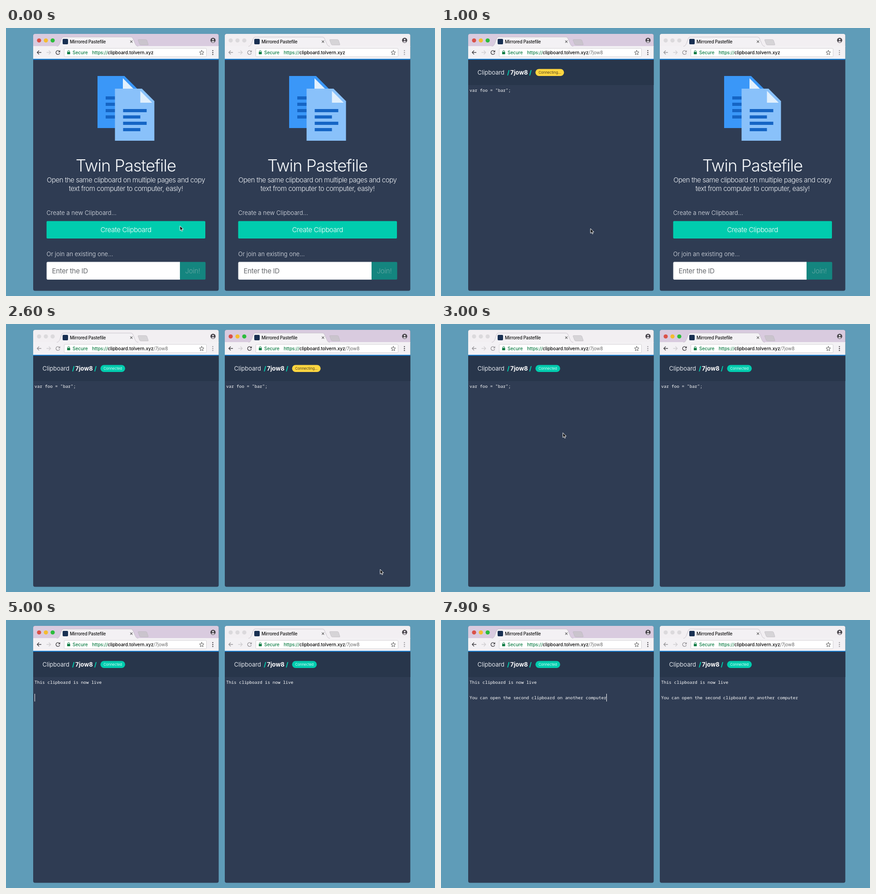
An HTML page with a canvas that plays this animation: 947x592 px, repeating every 8000 ms.

```html
<!DOCTYPE html>
<html lang="en">
<head>
<meta charset="utf-8">
<title>Shared clipboard</title>
<style>
html, body { margin: 0; width: 947px; height: 592px; overflow: hidden; background: #5f9cb8; }
canvas { display: block; }
</style>
</head>
<body>
<canvas id="stage" width="947" height="592"></canvas>
<script>
const ctx = document.getElementById('stage').getContext('2d');
const LOOP = 8000, ID = '7jow8', TEAL = '#00ccae';
const SANS = 'Inter, "Open Sans", sans-serif', MONO = '"Noto Sans Mono", monospace';
const LINE1 = 'This clipboard is now live';
const LINE2 = 'You can open the second clipboard on another computer';

const clamp = (v, lo, hi) => Math.max(lo, Math.min(hi, v));
const between = (t, a, b) => t >= a && t < b;
const typed = (t, start, step, max) => clamp(Math.floor((t - start) / step), 0, max);

function text(s, x, y, size, color, { weight = 400, spacing = 0, align = 'left', family = SANS } = {}) {
  ctx.font = `${weight} ${size}px ${family}`;
  ctx.letterSpacing = spacing + 'px';
  ctx.textAlign = align;
  ctx.fillStyle = color;
  ctx.fillText(s, x, y);
  return x + ctx.measureText(s).width;
}

function box(x, y, w, h, color, radius = 0, stroke) {
  ctx.beginPath();
  ctx.roundRect(x, y, w, h, radius);
  ctx.fillStyle = color;
  ctx.fill();
  if (stroke) { ctx.strokeStyle = stroke; ctx.lineWidth = 1; ctx.stroke(); }
}

function dot(x, y, r, color) {
  ctx.beginPath();
  ctx.arc(x, y, r, 0, 7);
  ctx.fillStyle = color;
  ctx.fill();
}

function shape(points, fill, stroke, width = 1) {
  const path = new Path2D('M' + points);
  if (fill) { ctx.fillStyle = fill; ctx.fill(path); }
  if (stroke) { ctx.strokeStyle = stroke; ctx.lineWidth = width; ctx.stroke(path); }
}

function chrome(active, path) {
  const icon = active ? '#444246' : '#99979b', bar = '#f3f1f4';
  box(60, 13, 409.5, 28, active ? '#d9cbdf' : '#f2eff2', [4, 4, 0, 0]);
  ['#da5148', '#f5bc2f', '#2cbc3c'].forEach((c, i) =>
    dot(73 + i * 15, 27.5, 4.6, active ? c : '#dbd9dc'));

  box(60, 40, 409.5, 28, bar);
  shape('112 40.5C117 40 118 36 120 31L123 23Q124 20 127 20H276Q279 20 280 23L284 32C286 37 287 40 292 40.5', bar, '#bdb6c0', .8);
  shape('293 25.5H308Q310 25.5 311 27L314 36Q314.5 37.5 313 37.5H298Q296 37.5 295 36L291.5 27Q291 25.5 293 25.5Z',
    active ? '#cac4cd' : '#d6d4d7', '#b8b2bb', .6);
  box(125, 24, 12, 12, '#193052', 2);
  text('Mirrored Pastefile', 141, 33.5, 9.7, '#111', { weight: 500, spacing: -.17 });
  shape('274.2 27.7L279.2 32.7M279.2 27.7L274.2 32.7', null, '#555', 1.1);

  dot(457, 27.3, 5.7, '#49464c');
  dot(457, 25.6, 1.9, '#e8e2ea');
  shape('453.3 30.5Q457 27 460.7 30.5Q457 33.5 453.3 30.5Z', '#e8e2ea');

  shape('78 54H69M73 49.8L68.8 54L73 58.2', null, icon, 1.4);
  shape('89.5 54H98.5M94.5 49.8L98.7 54L94.5 58.2', null, '#d0ced1', 1.4);
  ctx.beginPath();
  ctx.arc(114.5, 54.2, 4.2, .3, 5.5);
  ctx.strokeStyle = icon;
  ctx.lineWidth = 1.4;
  ctx.stroke();
  shape('119.5 49V53.5H115Z', icon);

  box(128.5, 45, 314, 18.5, '#fff', 2, '#d2d0d3');
  box(135, 53, 6.6, 5, '#0b7c43', .7);
  shape('136.3 53.5V52Q136.3 50 138.3 50Q140.3 50 140.3 52V53.5', null, '#0b7c43', 1.1);
  text('Secure', 147, 58, 10, '#0b7c43', { weight: 500 });
  let x = text('https://', 190, 58, 10, '#0b7c43', { weight: 500, spacing: -.05 });
  x = text('clipboard.tolvern.xyz', x, 58, 10, '#000', { weight: 500 });
  text(path, x, 58, 10, '#666');
  shape('432 49.2L433.4 52.7L437 53L434.2 55.4L435.1 59L432 57L428.9 59L429.8 55.4L427 53L430.6 52.7Z',
    null, '#555', 1);
  [50, 54.2, 58.4].forEach(y => dot(456.5, y, 1.2, icon));
  box(60, 68, 409.5, 2.2, '#1b82d6');
}

function sheet(x, y, body) {
  ctx.save();
  ctx.translate(x, y);
  shape('0 0H59.5L87 27.5V115H0Z', body);
  shape('56 5V31H82Z', '#e1f0fd');
  [52, 38, 52, 38].forEach((w, i) => box(18, 45 + i * 14, w, 7, '#1565c5'));
  ctx.restore();
}

function home(value, focused) {
  const light = { weight: 300, spacing: -.46, align: 'center' };
  const label = { weight: 300, spacing: .05 };
  sheet(202, 106, '#3a97f8');
  sheet(240.5, 134, '#89c1fa');
  text('Twin Pastefile', 264.5, 317, 36.5, '#f5f8fb', { ...light, spacing: -1 });
  text('Open the same clipboard on multiple pages and copy', 264.7, 341, 15, '#f1f4f8', light);
  text('text from computer to computer, easly!', 264.7, 360, 15, '#f1f4f8', light);

  text('Create a new Clipboard...', 89.5, 412.7, 13, '#e2e6ec', label);
  box(89.5, 426.5, 350.5, 38.5, TEAL, 2);
  text('Create Clipboard', 264.7, 451, 15, '#fff', { ...light, spacing: -.33 });

  text('Or join an existing one...', 89.5, 503.5, 13, '#e2e6ec', label);
  box(90, 517, 294, 38.5, '#fff', [2, 0, 0, 2], focused ? TEAL : '#dfe2e6');
  box(384, 516.7, 56.5, 39, value ? TEAL : '#14857f', [0, 2, 2, 0]);
  text('Join!', 412, 541.7, 15, value ? '#fff' : '#68aaa6', { ...light, spacing: -.2 });
  const end = value
    ? text(value, 102, 542, 15.5, '#222', { spacing: -.3 })
    : (text('Enter the ID', 101.5, 542.3, 15, '#66696d', { spacing: -.3 }), 102);
  if (focused) box(end, 528, 1, 17, '#222');
}

function board(connected, lines, caretLine) {
  box(60, 70, 409.5, 56, '#28364b');
  text('Clipboard', 80.5, 103, 13, '#e3e7ed');
  text('/', 146, 103, 13.5, TEAL, { weight: 800 });
  text(ID, 153, 103, 13, '#fff', { weight: 700, spacing: .1 });
  text('/', 194.8, 103, 13.5, TEAL, { weight: 800 });
  box(208.5, 90.5, connected ? 54.5 : 63, 15.5, connected ? TEAL : '#ffd640', 8);
  text(connected ? 'Connected' : 'Connecting...', 215.3, 101, 7.9, connected ? '#d9fff8' : '#4a4020');
  lines.forEach((s, i) => {
    const end = text(s, 63, 141 + i * 17, 9.5, '#fff', { weight: 500, family: MONO });
    if (i === caretLine) box(Math.round(end), 129 + i * 17, 1, 17, '#fff');
  });
}

function note(t) {
  if (t < 3246) return ['var foo = "bar";'];
  const lines = [LINE1.slice(0, typed(t, 3215, 31, LINE1.length))];
  if (t >= 4450) lines.push('');
  if (t >= 4650) lines.push(LINE2.slice(0, typed(t, 5102, 45, LINE2.length)));
  return lines;
}

function pane(offset, active, path, content) {
  ctx.save();
  ctx.translate(offset, 0);
  box(60, 13, 409.5, 567.5, '#2f3c53', 4);
  chrome(active, path);
  content();
  ctx.restore();
}

// time, x, y of the pointer tip
const PATH = [[0, 384, 437], [500, 372, 445], [1000, 330, 443], [1300, 640, 535],
  [1900, 640, 535], [2250, 828, 540], [2600, 826, 542], [3050, 250, 230], [LOOP, 250, 230]];

function pointer(t) {
  if (between(t, 1450, 1950) || t > 3200) return;
  const i = PATH.findIndex(p => p[0] > t);
  const [a, b] = [PATH[i - 1], PATH[i]];
  const u = (t - a[0]) / (b[0] - a[0]), k = u * u * (3 - 2 * u);
  ctx.save();
  ctx.translate(a[1] + (b[1] - a[1]) * k, a[2] + (b[2] - a[2]) * k);
  shape('0 0V10.5L2.4 8.3L4 12L5.8 11.2L4.2 7.6H7.5Z', '#111', '#fff', 1);
  ctx.restore();
}

// The caret shows while typing and blinks in the pauses.
const PAUSES = [[3050, 3215], [4100, 4450], [4650, 5102], [7487, LOOP]];

function caretShown(t) {
  const pause = PAUSES.find(([a, b]) => between(t, a, b));
  return t >= 3050 && (!pause || t - pause[0] < 500);
}

function draw(t) {
  box(0, 0, 947, 592, '#5f9cb8');
  const rightActive = between(t, 1330, 3050);
  const created = t >= 700, joined = t >= 2400;

  const lines = note(t);
  pane(0, !rightActive, created ? '/' + ID : '', () =>
    created ? board(t >= 1300, lines, caretShown(t) ? lines.length - 1 : -1) : home('', false));

  // The second window receives updates in batches.
  const synced = Math.floor((t - 3870) / 300) * 300 + 3870;
  pane(423, rightActive, joined ? '/' + ID : '', () =>
    joined ? board(t >= 2900, note(synced), -1)
      : home(ID.slice(0, typed(t, 1350, 115, ID.length)), rightActive));
  pointer(t);
}

function frame(now) {
  draw(now % LOOP);
  requestAnimationFrame(frame);
}
requestAnimationFrame(frame);
</script>
</body>
</html>
```
